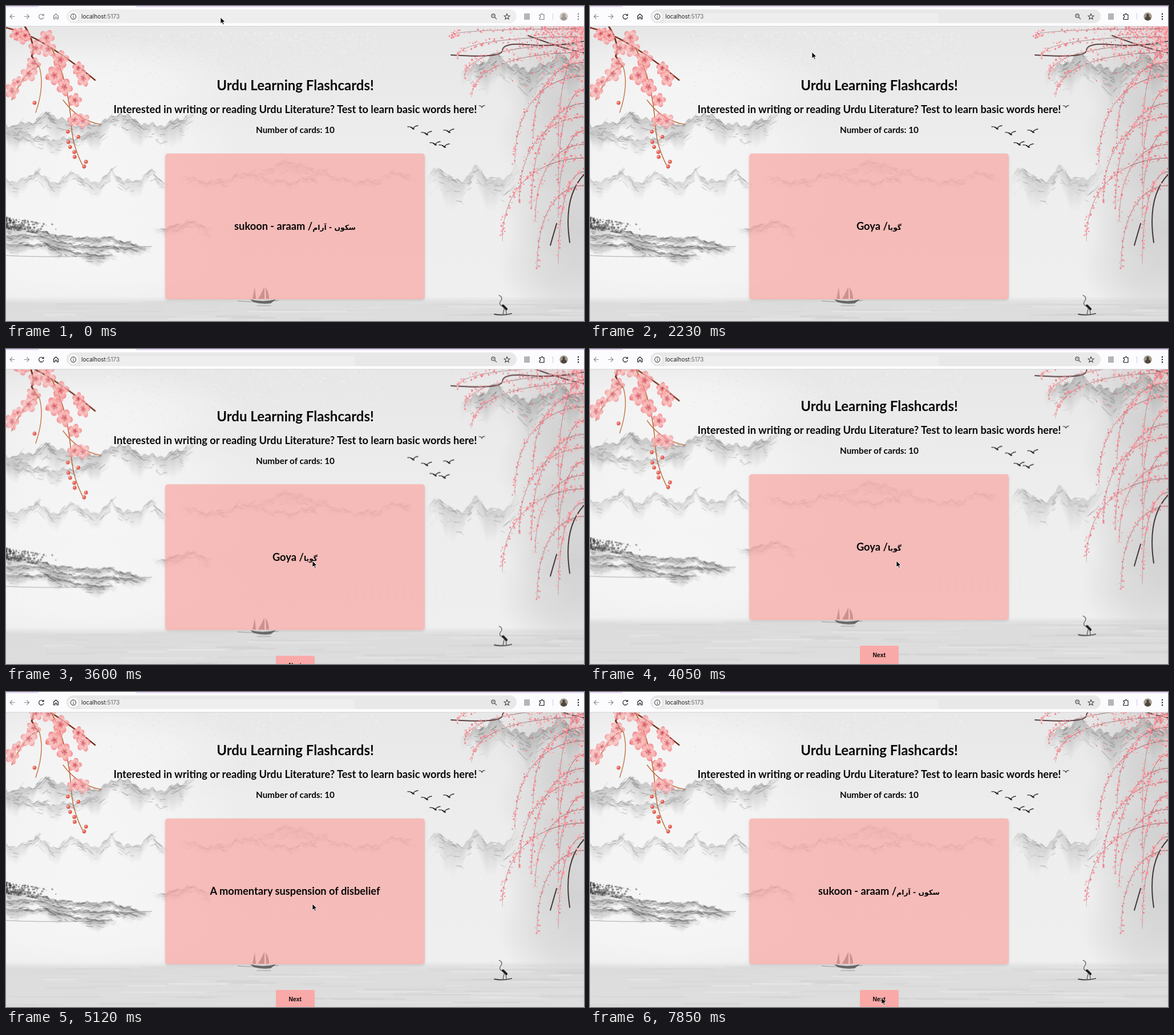
Recreate the animation shown at these times as an HTML page with a canvas. Size 1013 by 553 pixels, loop 8000 ms.

```html
<!DOCTYPE html>
<html lang="en">
<head>
<meta charset="utf-8">
<title>Flashcards</title>
<style>
  html, body { margin: 0; width: 100%; height: 100%; overflow: hidden; background: #e8e8e8; }
  #stage { position: relative; width: 1013px; height: 553px; overflow: hidden; }
  #page { position: absolute; inset: 0; font: 700 18.25px Lato, "DejaVu Sans", sans-serif; color: #080808; }
  canvas, svg { position: absolute; left: 0; top: 0; }
  .line { position: absolute; left: 0; width: 1014px; text-align: center; line-height: 30px; white-space: nowrap; }
  #card { position: absolute; left: 279px; top: 259px; width: 455px; height: 256px; border-radius: 5px;
    background: rgba(250,164,159,.68); box-shadow: 0 2px 4px rgba(0,0,0,.13);
    line-height: 254px; text-align: center; white-space: nowrap; }
  #card span { font: 700 12.3px "DejaVu Sans", sans-serif; }
  #next { position: absolute; left: 473px; top: 560px; width: 67.5px; height: 34px; border-radius: 3px;
    background: #f9a9a8; font: 700 10.4px/34px "Liberation Sans", Arial, sans-serif; text-align: center; }
</style>
</head>
<body>
<div id="stage">
  <div id="page">
    <canvas id="art" width="1013" height="600"></canvas>
    <div class="line" style="top:124px;font-size:24px">Urdu Learning Flashcards!</div>
    <div class="line" style="top:166px">Interested in writing or reading Urdu Literature? Test to learn basic words here!</div>
    <div class="line" style="top:202px;font-size:15.3px">Number of cards: 10</div>
    <div id="card"></div>
    <div id="next">Next</div>
  </div>
  <svg width="1013" height="553" fill="none" stroke-width="1.1">
    <path fill="#fcfbfd" d="M0 0H1013V35H0Z"/>
    <path fill="#e5d5fa" d="M0 0H57V2H0ZM228 0H1013V2H228Z"/>
    <path stroke="#d6d6d6" stroke-width="1" d="M0 35.5H1013"/>
    <rect id="pill" x="106" y="6" width="789" height="24" rx="12"/>
    <path id="patch" fill="#eee" d="M130 13H611V30H130Z"/>
    <path stroke="#8b8b8b" d="M15.5 18.5H7M11 14.5L7 18.5L11 22.5M32 18.5H40.5M36.5 14.5L40.5 18.5L36.5 22.5"/>
    <g id="icons" stroke="#161616">
      <path id="reload" d="M65.3 16.2A4.2 4.2 0 1 0 66 19.5M66 13.8V16.8H63"/>
      <path id="stop" d="M58.5 15L65.5 22M65.5 15L58.5 22"/>
      <path d="M83.5 17.5L87.5 14L91.5 17.5V22.8H89V19.5H86V22.8H83.5Z"/>
      <path d="M943 15.3V23.5H935V20.5A1.7 1.7 0 0 0 935 17V15.3H937.6A1.7 1.7 0 0 1 941 15.3Z"/>
      <path stroke-width="2.4" stroke-linecap="round" stroke-dasharray="0 4.5" d="M1003 14V24"/>
      <g stroke="none"><circle cx="977.5" cy="18.5" r="7.2" fill="#a39a8c"/><path fill="#4e463d" d="M972 23Q973 19 976 18A2.4 2.4 0 1 1 979 18Q982 19 983 23Q977.5 28 972 23Z"/></g>
    </g>
    <circle cx="118" cy="18.5" r="8.5" fill="#fbfbfb"/>
    <g stroke="#444">
      <circle cx="118" cy="18.5" r="4.6"/><path d="M118 18V21M118 15.8V16.9"/>
      <circle cx="854" cy="17.3" r="3.2"/><path d="M856.5 19.8L860 23.2M852.5 17.3H855.5"/>
      <path d="M878 13.6L879.4 17L883 17.3L880.2 19.6L881.1 23.1L878 21.2L874.9 23.1L875.8 19.6L873 17.3L876.6 17Z"/>
    </g>
    <path fill="#b5b5b5" d="M908 13H918V24H908Z"/>
    <path stroke="#d9c8f5" d="M958.5 13V24"/>
    <text x="132" y="22" font-family="Inter, sans-serif" font-size="10" fill="#222">localhost<tspan fill="#666">:5173</tspan></text>
    <path id="cursor" fill="#000" stroke="#fff" stroke-width=".8" d="M0 0V11L2.6 8.6L4.4 12.6L6.2 11.8L4.4 8H8Z"/>
  </svg>
</div>
<script>
const $ = id => document.getElementById(id);
const g = $('art').getContext('2d');

// ---- painting ----
let seed = 7;
const rnd = () => (seed = seed * 16807 % 2147483647) / 2147483647;
const spread = n => (rnd() - .5) * n;
const gray = (v, a = 1) => `rgba(${v},${v},${v},${a})`;

function wash(x, y, rx, ry, v, a) {
  const fade = g.createRadialGradient(0, 0, 0, 0, 0, 1);
  fade.addColorStop(0, gray(v, a));
  fade.addColorStop(.5, gray(v, a * .7));
  fade.addColorStop(1, gray(v, 0));
  g.save();
  g.translate(x, y);
  g.scale(rx, ry);
  g.fillStyle = fade;
  g.fillRect(-1, -1, 2, 2);
  g.restore();
}

function dot(x, y, r, color) {
  g.fillStyle = color;
  g.beginPath();
  g.arc(x, y, r, 0, 7);
  g.fill();
}

function ink(path, width, color) {
  g.strokeStyle = color;
  g.lineWidth = width;
  g.lineCap = 'round';
  g.stroke(new Path2D(path));
}

// Sharp peaks every `gap` pixels, fading downwards, with brush strokes on their slopes.
function range(from, to, top, { peak, gap, h, v, depth = h * 1.6, tilt = 0 }) {
  const crest = x => top + tilt * (x - from) + h * Math.abs(Math.sin(Math.PI * (x - peak) / gap))
    + h * .13 * Math.sin(x / 6) + h * .1 * Math.sin(x / 2.3);
  const edge = x => Math.min(1, from ? (x - from) / 25 : 1, to < 1013 ? (to - x) / 25 : 1);
  for (let x = from; x < to; x++) {
    const y = crest(x) + spread(1.5), d = depth * (.7 + .3 * Math.sin(x / 11));
    const fade = g.createLinearGradient(0, y, 0, y + d);
    fade.addColorStop(0, gray(v, .55 * edge(x)));
    fade.addColorStop(1, gray(v, 0));
    g.fillStyle = fade;
    g.fillRect(x, y, 1, d);
  }
  for (let i = 0; i < (to - from) * .5; i++) {
    const x = from + rnd() * (to - from), y = crest(x) + rnd() * rnd() * depth * .8;
    const len = 3 + rnd() * 9, slope = Math.max(-1, Math.min(1, (crest(x + 4) - crest(x - 4)) / 8));
    ink(`M${x} ${y}l${len} ${len * slope + spread(4)}`, .5 + rnd() * 1.3, gray(v - 35, .4 * edge(x)));
  }
}

function bird(x, y) {
  ink(`M${x - 9} ${y - 1}Q${x - 3} ${y - 2} ${x} ${y + 3}Q${x + 2} ${y - 2} ${x + 9} ${y - 3}`, 1.4, '#333');
  ink(`M${x - 3} ${y}L${x + 2} ${y + 3}`, 2, '#222');
}

function flower(x, y, r) {
  const pink = g.createRadialGradient(0, 0, 0, 0, 0, r);
  pink.addColorStop(0, '#e85a66');
  pink.addColorStop(.4, '#fac0ba');
  pink.addColorStop(.75, '#f9a5a5');
  pink.addColorStop(1, '#ee6f7a');
  g.save();
  g.translate(x, y);
  g.rotate(rnd() * 6);
  g.scale(1, .75 + rnd() * .25);
  g.globalAlpha = .6 + rnd() * .4;
  for (let i = 0; i < 5; i++) {
    g.rotate(Math.PI * .4);
    g.fillStyle = pink;
    g.beginPath();
    g.ellipse(0, -r * .56, r * .38, r * .44, 0, 0, 7);
    g.fill();
    ink(`M0 0V${-r * .4}M0 0L${r * .2} ${-r * .4}`, .7, '#c8364a');
  }
  g.restore();
}

// Blossoms or buds scattered evenly along a branch.
function branch(path, width, color, count, grow) {
  ink(path, width, color);
  const line = document.createElementNS('http://www.w3.org/2000/svg', 'path');
  line.setAttribute('d', path);
  for (let i = 0; i < count; i++) {
    const p = line.getPointAtLength(line.getTotalLength() * (i + .6) / count);
    grow(p.x, p.y);
  }
}
const bloom = (x, y) => flower(x + spread(26), y + spread(18), 11 + rnd() * 6);
const bud = (x, y) => {
  x += spread(24);
  dot(x, y, 3.4, '#df6054');
  dot(x - 1, y - 1, 1.7, '#f5a196');
};

const pinks = ['#f58f97', '#f9b9bb', '#ee7c88', '#f7a8ac'];
const petal = (x, y) => dot(x, y, .6 + rnd() * 1.2, pinks[rnd() * 4 | 0]);

// A twig from the right side that arches out to the left and then hangs.
function strand(x, y, reach, drop) {
  const at = u => [x - reach * Math.sin(u * Math.PI / 2), y + drop * u * u];
  for (let u = 0; u < 1; u += .05) ink(`M${at(u)}L${at(u + .05)}`, 1.3 - u * .7, 'rgba(130,80,85,.6)');
  for (let i = 0; i < (reach + drop) * .4; i++) {
    const [px, py] = at(rnd());
    petal(px + spread(12) * rnd(), py + spread(12));
  }
}

function paint() {
  const base = g.createLinearGradient(0, 0, 0, 600);
  [[0, 230], [.5, 238], [.85, 239], [.87, 220], [1, 222]].forEach(([at, v]) => base.addColorStop(at, gray(v)));
  g.fillStyle = base;
  g.fillRect(0, 0, 1013, 600);
  for (let y = 140; y < 480; y += 100) wash(150, y, 280, 90, 248, .8);
  for (let y = 120; y < 560; y += 110) wash(1000, y, 140, 110, 190, .5);
  for (let i = 0; i < 1300; i++) {
    g.fillStyle = gray(rnd() < .7 ? 246 : 224, .6);
    g.fillRect(170 + rnd() * 480, 45 + rnd() * rnd() * 190, 1 + rnd() * 2, 1 + rnd());
  }

  range(0, 330, 187, { peak: 75, gap: 125, h: 22, v: 165, depth: 48 });
  range(0, 170, 216, { peak: 10, gap: 160, h: 18, v: 185 });
  range(0, 285, 288, { peak: 185, gap: 67, h: 20, v: 195 });
  range(300, 720, 290, { peak: 425, gap: 130, h: 18, v: 208, depth: 16 });
  range(440, 560, 270, { peak: 495, gap: 130, h: 18, v: 205 });
  range(735, 900, 280, { peak: 757, gap: 68, h: 26, v: 185, depth: 60 });
  range(795, 1013, 84, { peak: 855, gap: 115, h: 26, v: 150, depth: 60 });
  range(255, 360, 377, { peak: 320, gap: 130, h: 14, v: 175 });

  // islands and their trees
  for (let i = 0; i < 3; i++)
    range(0, 255 - 30 * i, 382 + 13 * i, { peak: 30 + 20 * i, gap: 150, h: 8, v: 130, depth: 22, tilt: .13 });
  for (let i = 0; i < 170; i++) {
    const x = rnd() * rnd() * 100;
    dot(x, 371 + x * .15 + rnd() * 20, .7 + rnd() * 1.5, gray(70, .5));
  }
  ink('M0 438Q80 442 187 438M100 422Q180 428 255 422', 1.2, gray(120, .6));

  // water
  for (let i = 0; i < 130; i++) {
    g.fillStyle = gray(190 + rnd() * 55 | 0, .32);
    g.fillRect(rnd() * 1100 - 90, 515 + rnd() * 80, 30 + rnd() * 160, 1 + rnd() * 2.5);
  }

  // boat
  g.fillStyle = gray(75, .8);
  g.fill(new Path2D('M428 515Q450 521 473 515L464 522Q448 524 434 520ZM432 514L436 494L438 514ZM442 514Q447 505 453 493V514ZM456 514L455 494Q461 503 461 514Z'));
  ink('M406 518Q440 521 477 517M440 526H464', 1.1, gray(110, .6));

  // crane
  ink('M864 508Q872 511 867 518T873 528M873 532L871 541M876 532L877 541', 1.2, '#555');
  ink('M871 526L877 532', 4, '#222');
  ink('M856 541Q870 544 886 540', 1.8, '#444');

  for (const [x, y] of [[713, 213], [737, 223], [776, 219], [752, 241], [768, 245]]) bird(x, y);
  ink('M829 175Q833 175 834 178Q836 174 839 175', 1.2, '#333');

  // left blossoms
  branch('M56 106Q34 112 10 165', 1.5, '#bd6a3a', 3, bloom);
  branch('M115 215Q118 250 137 285', 1.5, '#bd6a3a', 8, bud);
  branch('M56 100Q70 135 52 187', 1.3, '#bd6a3a', 2, bud);
  branch('M100 165Q125 200 166 208', 1.3, '#bd6a3a', 1, bloom);
  branch('M32 34Q54 70 45 88L56 106', 3, '#7d3420', 3, bloom);
  branch('M0 38Q40 48 80 74T156 130', 2.6, '#7d3420', 7, bloom);
  branch('M80 74Q110 130 115 215', 1.6, '#bd6a3a', 5, bloom);
  flower(85, 122, 17);

  // right blossoms
  ink('M1013 62Q960 72 915 68T870 78T780 86M1013 82Q985 78 915 52', 2, '#5f3f3f');
  ink('M1013 296Q976 335 988 415M965 382L954 420', 2, '#453636');
  for (let i = 0; i < 600; i++) petal(1013 - rnd() * rnd() * 135, 36 + rnd() * rnd() * 110);
  for (let i = 0; i < 4; i++) strand(1000, 40 + i * 14, 220 - i * 12, 12 + i * 22);
  for (let i = 0; i < 11; i++) strand(1013, 75 + i * 24, 45 + 42 * (i % 3) * (.8 + rnd() * .4), 130 + rnd() * 60);
}

// ---- motion: each change advances in equal ticks ----
const LOOP = 8000, TICK = 146;
const cursorMoves = [
  { at: 140, ticks: 2, dx: 13, dy: 61 },
  { at: 2376, ticks: 2, dx: 144, dy: 277 },
  { at: 2980, ticks: 1, dx: 4, dy: 14 },
  { at: 6904, ticks: 3, dx: -27, dy: 164 },
  { at: 7400, ticks: 1, dx: 1, dy: 1 }
];
const words = {
  calm: 'sukoon - araam /<span>سکوں - آرام</span>',
  asIf: 'Goya /<span>گویا</span>',
  meaning: 'A momentary suspension of disbelief'
};

const ramp = (t, at, ticks) => Math.max(0, Math.min(1, (Math.floor((t - at) / TICK) + 1) / ticks));
const easeOut = u => 1 - (1 - u) ** 2;
const overshoot = u => 1 + 2.36 * (u - 1) ** 3 + 1.36 * (u - 1) ** 2;
const show = (id, on) => $(id).style.display = on ? '' : 'none';

function draw(now) {
  const t = now % LOOP;

  const turn = easeOut(ramp(t, 4826, 3)) - easeOut(ramp(t, 6320, 4));
  const word = turn > .5 ? 'meaning' : t < 2230 || t >= 7850 ? 'calm' : 'asIf';
  $('card').innerHTML = words[word];
  $('card').style.transform = `scaleX(${Math.abs(Math.cos(turn * Math.PI))})`;

  const scroll = 37 * overshoot(ramp(t, 3600, 6));
  $('page').style.transform = `translateY(${-scroll}px)`;

  let x = 376, y = 20;
  for (const m of cursorMoves) {
    const u = ramp(t, m.at, m.ticks);
    x += m.dx * u;
    y += m.dy * u;
  }
  $('cursor').setAttribute('transform', `translate(${x} ${y})`);

  const loading = t >= 1780 && t < 2230;
  $('icons').style.opacity = .55 + .45 * ramp(t, 1190, 3);
  $('pill').setAttribute('fill', t < 1780 ? '#eee' : '#e8e8e8');
  show('patch', t >= 2230);
  show('reload', !loading);
  show('stop', loading);
  requestAnimationFrame(draw);
}

paint();
draw(0);
</script>
</body>
</html>
```
